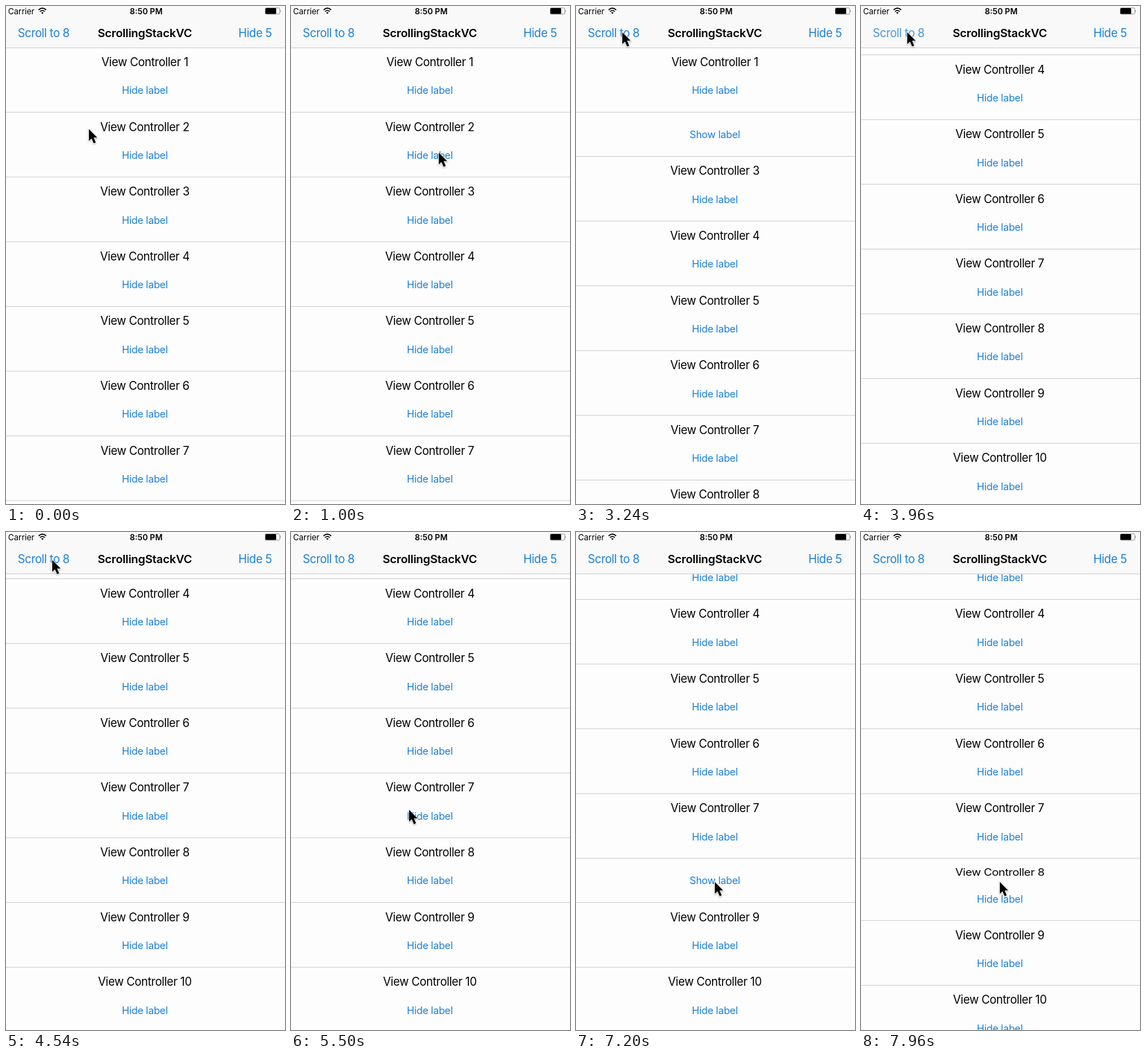
An HTML page for the animation above (8000 ms loop, 404 by 720 pixels).

```html
<!DOCTYPE html>
<html lang="en">
<head>
<meta charset="utf-8">
<title>ScrollingStackVC</title>
<style>
  html, body { margin: 0; width: 100%; height: 100%; overflow: hidden; background: #fdfdfd; }
  svg { display: block; width: 404px; height: 720px; font-family: Inter, Roboto, sans-serif; }
  .label, .nav { font-size: 16.6px; letter-spacing: -.36px; }
  .button { font-size: 14.64px; letter-spacing: -.24px; }
  .button, .nav { fill: #1c7fd6; }
  .title { font-size: 16.6px; font-weight: 600; letter-spacing: -.18px; }
  .status { font-size: 11.7px; }
  .middle { text-anchor: middle; }
  .line { fill: #cfced3; }
  #cursor { filter: drop-shadow(0 1px 1px rgba(0, 0, 0, .3)); }
</style>
</head>
<body>
<svg viewBox="0 0 404 720">
  <rect width="404" height="720" fill="#fdfdfd"/>
  <g id="rows"></g>

  <rect width="404" height="60" fill="#f9f9f9"/>
  <rect class="line" y="60" width="404" height="1"/>
  <text class="status" x="3" y="11.8">Carrier</text>
  <g fill="none" stroke="#000" stroke-width="1.6">
    <path d="M47.2 5.6Q52.7 .8 58.2 5.6M49.2 8Q52.7 5 56.2 8"/>
    <path d="M52.7 11.6L50.8 9.6Q52.7 8.2 54.6 9.6Z" fill="#000" stroke="none"/>
  </g>
  <text class="status middle" x="203" y="11.8" font-weight="600">8:50 PM</text>
  <rect x="375.5" y="2.8" width="21" height="9" rx="1.8" fill="none" stroke="#777" stroke-width=".7"/>
  <rect x="375.6" y="3" width="15.6" height="8.6" rx="1.4"/>
  <path d="M397.4 5.6Q399 7.3 397.4 9Z" fill="#777"/>
  <text class="nav" id="scrollButton" x="17" y="45.2">Scroll to 8</text>
  <text class="title middle" x="201" y="45.2">ScrollingStackVC</text>
  <text class="nav" x="385" y="45.2" text-anchor="end">Hide 5</text>

  <path id="cursor" d="M0 0V17L3.9 13.4L7 20.6L10 19.3L7 12.3H12.2Z"
        stroke="#fff" stroke-width="1.4" paint-order="stroke"/>
</svg>
<script>
  const LOOP = 8000, TOP = 60, ROW = 93.6, LABEL = 29.8, SCROLL = 243.4;
  const HIDE_2 = 1500, SCROLL_AT = 3615, HIDE_8 = 5870, SHOW_8 = 7765;
  const $ = id => document.getElementById(id);

  const add = (parent, tag, attrs, text = '') => {
    const el = document.createElementNS('http://www.w3.org/2000/svg', tag);
    for (const key in attrs) el.setAttribute(key, attrs[key]);
    el.textContent = text;
    return parent.appendChild(el);
  };

  const rows = Array.from({ length: 10 }, (_, i) => {
    const group = add($('rows'), 'g', {});
    const label = add(group, 'g', {});
    add(label, 'text', { class: 'label middle', x: 201, y: 17.2 }, `View Controller ${i + 1}`);
    const button = add(group, 'text', { class: 'button middle', x: 201 }, 'Hide label');
    const line = add(group, 'rect', { class: 'line', width: 404, height: 1 });
    return { group, label, button, line };
  });

  // Critically damped spring that settles in half a second.
  const spring = ms => {
    if (ms <= 0) return 0;
    if (ms >= 500) return 1;
    const x = ms * .0185;
    return 1 - (1 + x) * Math.exp(-x);
  };

  const path = [
    [0, 120, 178], [60, 120, 178], [800, 214, 212], [2450, 214, 212], [3250, 67, 38],
    [4300, 67, 38], [4500, 67, 40.5], [5050, 67, 40.5], [5700, 201, 506], [LOOP, 201, 506]
  ];

  function cursorAt(t) {
    const i = path.findIndex(p => p[0] > t);
    const [t0, x0, y0] = path[i - 1], [t1, x1, y1] = path[i];
    const u = (t - t0) / (t1 - t0), e = u * u * (3 - 2 * u);
    return [x0 + (x1 - x0) * e, y0 + (y1 - y0) * e];
  }

  function shown(number, t) {
    if (number === 2) return 1 - spring(t - HIDE_2);
    if (number === 8) return 1 - spring(t - HIDE_8) + spring(t - SHOW_8);
    return 1;
  }

  function draw(now) {
    const t = now % LOOP;
    // Hiding row 8 shortens the content, which pulls the scroll position back.
    const offset = SCROLL * spring(t - SCROLL_AT) - LABEL * spring(t - HIDE_8);
    let y = TOP - offset;

    rows.forEach(({ group, label, button, line }, i) => {
      const number = i + 1, part = shown(number, t), lost = LABEL * (1 - part);
      const hidden = number === 2 ? t >= HIDE_2 : number === 8 && t >= HIDE_8 && t < SHOW_8;
      group.setAttribute('transform', `translate(0 ${y})`);
      label.setAttribute('transform', `translate(0 9.8) scale(1 ${part})`);
      label.setAttribute('visibility', part > 0 ? 'visible' : 'hidden');
      button.setAttribute('y', 67.4 - lost);
      button.textContent = hidden ? 'Show label' : 'Hide label';
      line.setAttribute('y', ROW - lost - .5);
      y += ROW - lost;
    });

    const fade = Math.min(1, Math.max(0, (t - SCROLL_AT) / 485));
    $('scrollButton').setAttribute('opacity', t < SCROLL_AT - 95 ? 1 : .35 + .65 * fade);
    $('cursor').setAttribute('transform', `translate(${cursorAt(t)})`);
  }

  const start = performance.now();
  function tick() {
    draw(performance.now() - start);
    requestAnimationFrame(tick);
  }
  tick();
</script>
</body>
</html>
```
